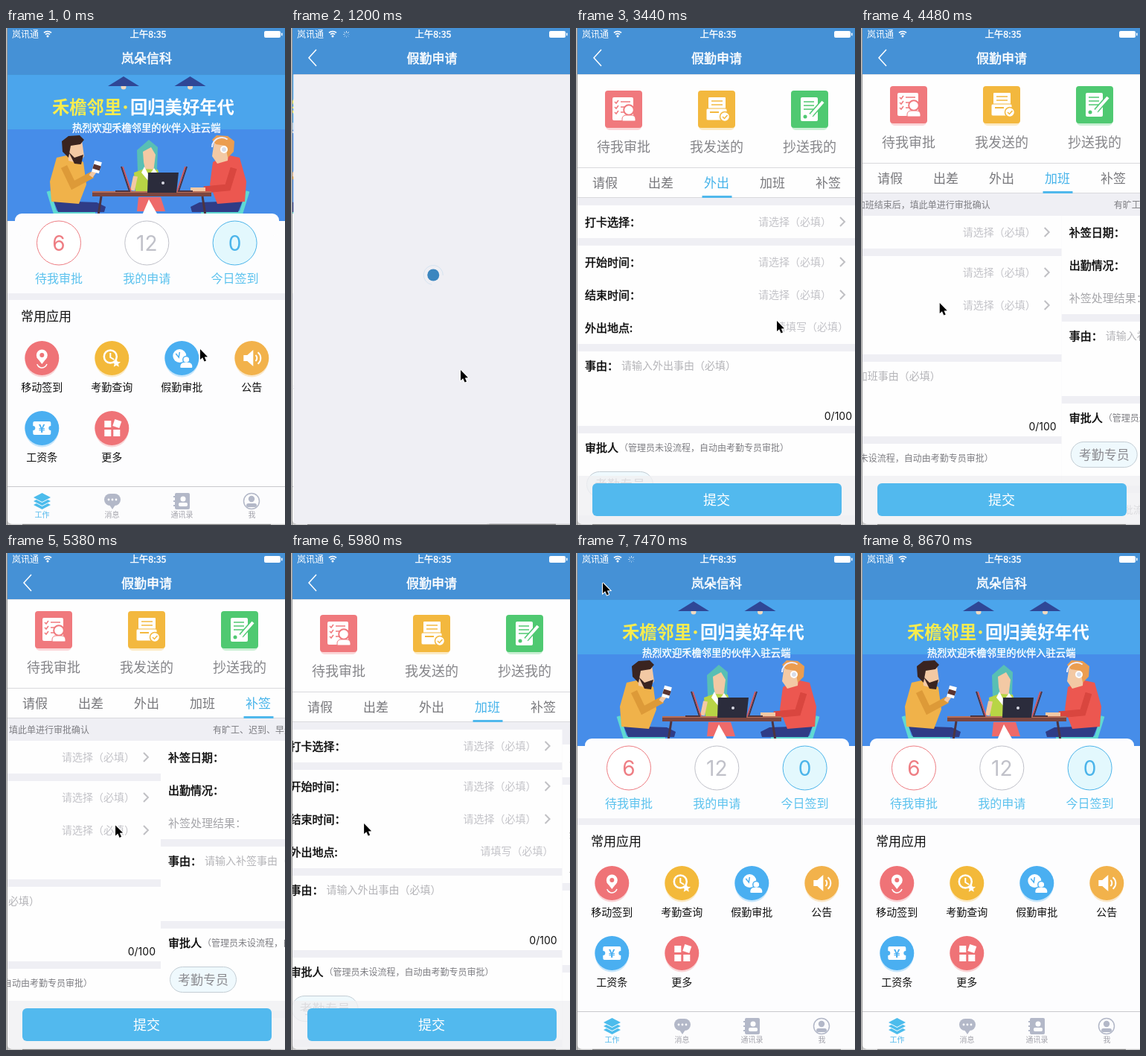
Recreate the animation shown at these times as an HTML page with a canvas. Size 375x667 px, loop 8770 ms.

```html
<!DOCTYPE html>
<html lang="zh">
<head>
<meta charset="utf-8">
<title>假勤申请</title>
<style>
html, body { margin: 0; width: 375px; height: 667px; overflow: hidden; background: #c6c6c6; }
canvas { display: block; width: 375px; height: 667px; }
</style>
</head>
<body>
<canvas id="stage"></canvas>
<script>
const cv = document.getElementById('stage');
const dpr = window.devicePixelRatio || 1;
cv.width = 375 * dpr;
cv.height = 667 * dpr;
const c = cv.getContext('2d');
const LOOP = 8770, STEP = 150, PAGE_W = 376;
const FONT = '"Noto Sans CJK SC", "Noto Sans CJK", "Noto Sans CJK JP", sans-serif';
const DIGITS = 'Inter, "Liberation Sans", sans-serif';
const BLUE = '#50b8ec', GREY = '#efeff4', WHITE = '#fefefe', NAV = '#4591d6', SKIN = '#f3c9a4', DARK = '#4d3440';

// ---- drawing helpers ----
function rect(x, y, w, h, col) { c.fillStyle = col; c.fillRect(x, y, w, h); }
function paint(fill, stroke, w = 1) {
  if (fill) { c.fillStyle = fill; c.fill(); }
  if (stroke) { c.strokeStyle = stroke; c.lineWidth = w; c.stroke(); }
}
function round(x, y, w, h, r, fill, stroke) {
  c.beginPath();
  c.roundRect(x, y, w, h, r);
  paint(fill, stroke);
}
function arc(x, y, r, from, to, col, w) {
  c.beginPath();
  c.arc(x, y, r, from, to);
  paint(null, col, w);
}
function circle(x, y, r, fill, stroke, w) {
  c.beginPath();
  c.arc(x, y, r, 0, 7);
  paint(fill, stroke, w);
}
function trace(p) {
  c.beginPath();
  for (let i = 0; i < p.length; i += 2) c.lineTo(p[i], p[i + 1]);
}
function poly(col, ...p) { trace(p); c.closePath(); paint(col); }
function line(col, w, ...p) { trace(p); paint(null, col, w); }
// Weight 500 is a regular face thickened by a hairline stroke.
function text(s, x, y, size, col, align = 'left', weight = 400, font = FONT) {
  const medium = weight === 500;
  c.font = `${medium ? 400 : weight} ${size}px ${font}`;
  c.textAlign = align;
  c.fillStyle = c.strokeStyle = col;
  c.lineWidth = size * 0.03;
  c.fillText(s, x, y + size * 0.37);
  if (medium) c.strokeText(s, x, y + size * 0.37);
}
function at(x, y, draw) { c.save(); c.translate(x, y); draw(); c.restore(); }
function clip(x, y, w, h) { c.beginPath(); c.rect(x, y, w, h); c.clip(); }
function fade(a, draw) { c.globalAlpha = a; draw(); c.globalAlpha = 1; }

// ---- motion ----
const clamp = v => Math.max(0, Math.min(1, v));
const smooth = v => v * v * (3 - 2 * v);
const easeOut = v => 1 - (1 - v) ** 3;

function tickAt(t) {
  const drift = [2240, 3880, 6120].filter(d => t >= d).length * 10;
  return Math.floor((t + drift) / STEP);
}

// Four swipes forward through the tabs, then four back.
const SWIPES = [13, 19.9, 25, 29, 34.5, 37.5, 40.4, 43.6], SWIPE_LEN = 2.82;
function swipeState(n) {
  let pos = 0, tab = 0, sway = 0;
  SWIPES.forEach((start, k) => {
    const p = clamp((n - start) / SWIPE_LEN), dir = k < 4 ? 1 : -1;
    pos += dir * smooth(p);
    sway -= dir * 90 * Math.sin(2 * Math.PI * p);
    if (p === 1) tab += dir;
  });
  return { pos, tab, sway };
}
function pushAt(n) {
  return n < 30 ? easeOut(clamp((n - 4.6) / 4)) : 1 - easeOut(clamp((n - 48) / 2));
}
const scrollAt = n => n < 29 ? 0 : n < 38 ? -6 : -1;

// Key points of the pointer; each swipe adds its own sway.
const MOUSE = [
  [0, 261, 431], [8, 228, 459], [11, 228, 459], [23, 270, 393], [30, 177, 369],
  [40, 157, 363], [47, 79, 355], [49.5, 36, 40], [52, 36, 40], [54, 261, 407], [58, 261, 407]
];
function drawMouse(n) {
  if (n >= 58) return;
  const i = Math.max(1, MOUSE.findIndex(k => k[0] >= n));
  const [a, x0, y0] = MOUSE[i - 1], [b, x1, y1] = MOUSE[i];
  const p = (n - a) / (b - a);
  at(x0 + (x1 - x0) * p + swipeState(n).sway, y0 + (y1 - y0) * p, () => {
    const arrow = [0, 0, 0, 14, 3.2, 11.2, 5.6, 16.5, 8, 15.4, 5.8, 10.4, 10, 10.2];
    line('#fff', 2, ...arrow, 0, 0);
    poly('#000', ...arrow);
  });
}

// ---- home ----
// One seated figure facing right; the opposite seat mirrors it.
function drawSitter(shirt, hair, bearded) {
  line('#5fd9d2', 5, 57, 219, 66, 248, 120, 248);
  poly('#2f3c86', 64, 232, 122, 234, 134, 240, 132, 247, 70, 247);
  poly(shirt, 68, 174, 86, 170, 104, 180, 108, 210, 98, 236, 61, 233, 59, 206);
  poly(SKIN, 82, 154, 102, 151, 105, 172, 98, 182, 84, 178);
  poly(hair, 75, 152, 84, 145, 99, 144, 105, 150, 100, 156, 87, 158, 84, 174, 76, 166);
  if (bearded) poly(hair, 84, 166, 92, 174, 104, 170, 101, 183, 92, 182);
}

function drawPeople() {
  drawSitter('#f0b24a', '#3a2420', true);
  line('#dd9a38', 9, 78, 186, 90, 211, 116, 197);
  line(SKIN, 6, 114, 199, 122, 188);
  line('#fff', 10, 124, 179, 120, 194);
  line('#5a3430', 10, 123, 184, 121, 190);
  c.save();
  c.translate(382, 0);
  c.scale(-1, 1);
  drawSitter('#ec5750', '#eb9d50', false);
  line('#d9463f', 9, 76, 188, 84, 214, 116, 217);
  line(SKIN, 6, 114, 217, 134, 217);
  arc(92, 160, 13, -2.2, 0, '#eef', 2);
  circle(89, 163, 4, '#d8dce8', '#fff', 2);
  c.restore();

  poly('#58bfb4', 177, 192, 176, 164, 192, 150, 204, 160, 203, 190);
  poly(SKIN, 184, 166, 195, 160, 201, 170, 198, 194, 188, 194, 185, 180);
  poly('#b8d545', 172, 194, 186, 189, 204, 190, 212, 220, 174, 220);
  poly('#fff', 186, 186, 192, 198, 199, 188, 203, 194, 192, 206, 182, 194);
  line(SKIN, 6, 174, 199, 170, 218);
  poly('#ee6a6a', 178, 227, 208, 227, 214, 246, 176, 246);
  poly('#fff', 192, 230, 208, 258, 180, 258);

  rect(116, 220, 160, 6, '#7b4640');
  rect(116, 219, 160, 2, '#b96f58');
  for (const s of [-1, 1]) {
    line(DARK, 3, 196 + 68 * s, 226, 196 + 73 * s, 258);
    line(DARK, 2, 199 + 44 * s, 186, 199 + 33 * s, 219, 199 + 52 * s, 219);
    line('#e4534f', 1.5, 199 + 42 * s, 186, 199 + 31 * s, 219);
  }
  poly('#2b2c3c', 191, 194, 232, 194, 229, 221, 190, 221);
  circle(211, 208, 2, '#d9dae4');
}

function drawBanner() {
  rect(0, 62, 375, 74, '#4ba5ec');
  rect(0, 136, 375, 123, '#468de9');
  for (const x of [158, 247.5]) {
    circle(x, 79, 3.5, '#f0d9bf');
    poly('#2f4796', x - 21, 78, x, 65, x + 21, 78);
  }
  text('禾檐邻里', 62, 106, 23.3, '#f6ec4f', 'left', 700);
  text('·', 160.5, 106, 18, '#f6ec4f', 'center', 700);
  text('回归美好年代', 167, 106, 23.3, '#fff', 'left', 700);
  text('热烈欢迎禾檐邻里的伙伴入驻云端', 89, 134, 13.3, '#fff', 'left', 500);
  drawPeople();
}

function star(x, y, r) {
  const p = [];
  for (let i = 0; i < 10; i++) {
    const a = i * Math.PI / 5 - Math.PI / 2, d = i % 2 ? r * 0.45 : r;
    p.push(x + d * Math.cos(a), y + d * Math.sin(a));
  }
  poly('#fff', ...p);
}
const APPS = [
  ['移动签到', '#ef7377', col => {
    poly('#fff', -7, -1, 7, -1, 0, 8);
    circle(0, -4, 7.5, '#fff');
    circle(0, -4, 3, col);
    arc(0, 6, 7, 0.3, 2.8, '#fff', 1.5);
  }],
  ['考勤查询', '#f3b93a', () => {
    circle(-2, -2, 8.5, null, '#fff', 2.5);
    line('#fff', 2, -2, -7, -2, -1, 3, 2);
    star(6, 7, 6);
  }],
  ['假勤审批', '#4aaff1', col => {
    circle(-3, -3, 9, '#fff');
    line(col, 1.5, -8, -6, -4, -1, -3, -8);
    circle(6, 2, 4.5, '#fff', col, 1.5);
    round(-2, 6, 16, 7, [5, 5, 1, 1], '#fff');
  }],
  ['公告', '#f2b24b', () => {
    poly('#fff', -11, -4, -6, -4, 2, -11, 2, 11, -6, 4, -11, 4);
    for (const r of [5, 10]) arc(2, 0, r, -0.9, 0.9, '#fff', 2);
  }],
  ['工资条', '#4aaff1', col => {
    round(-12, -9, 24, 18, 2, '#fff');
    for (const x of [-12, 12]) circle(x, 0, 3, col);
    text('¥', 0, 0, 15, col, 'center', 700);
  }],
  ['更多', '#ef7377', () => {
    for (const [x, y] of [[-10, -10], [-10, 2], [2, 2]]) rect(x, y, 9, 9, '#fff');
    poly('#fff', 4, -12, 13, -9, 10, 0, 1, -3);
  }]
];

function drawTabBar() {
  const bg = '#fcfcfd', g = '#b3b8c8';
  rect(0, 615, 375, 52, bg);
  rect(0, 615, 375, 1, '#c9c9cd');
  ['工作', '消息', '通讯录', '我'].forEach((s, i) =>
    text(s, 48.5 + i * 94, 653, 10, i ? '#a3a3ab' : BLUE, 'center'));
  for (const y of [640, 635, 630]) {
    poly(bg, 35, y, 48.5, y - 7, 62, y, 48.5, y + 7);
    poly('#4cbcec', 37, y, 48.5, y - 6, 60, y, 48.5, y + 6);
  }
  round(132, 625, 22, 16, 8, g);
  poly(g, 139, 640, 147, 640, 143, 646);
  for (const x of [138, 143, 148]) circle(x, 633, 1.4, '#fff');
  round(227, 624, 20, 22, 2, g);
  for (const y of [628, 634, 640]) rect(225, y, 4, 2, g);
  circle(238, 632, 3.5, '#fff');
  round(232, 637, 12, 5, 2, '#fff');
  circle(330, 635, 10.5, null, g, 1.5);
  circle(330, 632, 4.2, g);
  round(323, 638, 14, 5, 3, g);
}

const STATS = [
  ['6', '待我审批', '#ee7d83', '#fff'],
  ['12', '我的申请', '#c0c1c9', '#fff'],
  ['0', '今日签到', '#4bb4ea', '#e3f8fd']
];
function drawHome() {
  rect(0, 62, 378, 605, '#fdfdfe');
  drawBanner();
  round(12, 249, 355, 30, 9, '#fdfdfe');
  STATS.forEach(([num, name, col, fill], i) => {
    const x = 71 + i * 118.3;
    circle(x, 288.5, 29.5, fill, col);
    text(num, x, 288.5, 28, col, 'center', 400, DIGITS);
    text(name, x, 336, 16, '#5bc2ee', 'center');
  });
  rect(0, 356, 378, 9, GREY);
  text('常用应用', 20, 387, 17, '#111');
  APPS.forEach(([name, col, icon], i) => {
    const x = 48.3 + (i % 4) * 94, y = i < 4 ? 443 : 537;
    fade(0.3, () => circle(x, y + 3, 22.5, col));
    circle(x, y, 23, col);
    at(x, y, () => icon(col));
    text(name, x, y + 38.7, 14, '#111', 'center');
  });
  drawTabBar();
}

// ---- request form ----
const PICK = 'pick', FILL = 'fill', CALC = 'calc', BARE = 'bare', DIM = 'dim';
const TIMES = [['开始时间：', PICK], ['结束时间：', PICK]];
const CLOCK = [['打卡选择：', PICK]];
const PRESET = '（管理员预设流程，但无您适用流程）';
const OPEN = '（管理员未设流程，自动由考勤专员审批）';
const PAGES = [
  { tab: '请假', groups: [[['请假类型：', PICK]], [...TIMES, ['请假时长：', CALC]]], note: PRESET, hintX: 66 },
  { tab: '出差', groups: [CLOCK, [...TIMES, ['出差地点:', FILL]]], note: PRESET },
  { tab: '外出', groups: [CLOCK, [...TIMES, ['外出地点:', FILL]]], note: OPEN, pill: true },
  { tab: '加班', groups: [CLOCK, [...TIMES, ['加班时长：', BARE]]], note: OPEN, pill: true,
    notice: '请加班结束后，填此单进行审批确认' },
  { tab: '补签', groups: [[['补签日期：', BARE], ['出勤情况：', BARE], ['补签处理结果：', DIM]]], note: OPEN, pill: true,
    notice: '有旷工、迟到、早退情况，可提交补签申请' }
];

const label = (s, y) => text(s, 12, y, 15, '#0a0a0a', 'left', 500);

function drawRow([name, kind], y) {
  if (kind === DIM) text(name, 12, y, 15, '#a5a5a9');
  else label(name, y);
  if (kind === PICK) {
    text('请选择（必填）', 245, y, 14, '#c3c3c8');
    line('#c0c0c4', 2, 355, y - 6, 361, y, 355, y + 6);
  } else if (kind === FILL) {
    text('请填写（必填）', 268, y - 1, 14, '#c3c3c8');
  } else if (kind === CALC) {
    round(311, y - 12.5, 46, 24, 12, '#9fe7fe');
    text('计算', 334, y, 15, '#3b8ecb', 'center', 500);
  }
}

function drawPage(pg) {
  let y = 238;
  if (pg.notice) {
    text(pg.notice, 186, 244, 12, '#7d7d82', 'center');
    y = 258;
  }
  for (const rows of pg.groups) {
    rect(2, y, PAGE_W, rows.length * 44, WHITE);
    rows.forEach((r, i) => drawRow(r, y + 22 + i * 44));
    y += rows.length * 44 + 10;
  }
  rect(2, y, PAGE_W, 100, WHITE);
  label('事由：', y + 19);
  text(`请输入${pg.tab}事由（必填）`, pg.hintX || 61, y + 18.5, 14, '#b4b4b8');
  text('0/100', 371, y + 87, 14, '#111', 'right', 400, DIGITS);
  y += 110;
  rect(2, y, PAGE_W, pg.pill ? 110 : 60, WHITE);
  label('审批人', y + 19);
  text(pg.note, 58, y + 20, 12, '#7d7d82');
  if (!pg.pill) return;
  round(14.5, y + 51.5, 89, 34, 17, '#eff9fd', '#c3cdd4');
  text('考勤专员', 59, y + 68.5, 17, '#8b8b90', 'center');
  rect(2, y + 120, PAGE_W, 60, WHITE);
  text('审批流程', 72, y + 142, 13, '#8b8b90');
}

const CARDS = [
  ['待我审批', '#f0797d', col => {
    round(10, 9, 28, 31, 2, '#fff');
    for (const y of [15, 22, 29]) {
      line(col, 1.5, 13, y, 15, y + 2, 18, y - 2);
      line(col, 1.5, 21, y, 34, y);
    }
    circle(32, 26, 6.8, '#fff', col, 2);
    round(23, 33, 18, 8, [5, 5, 1, 1], '#fff', col);
  }],
  ['我发送的', '#f3b83e', col => {
    round(14, 9, 23, 20, 1, '#fff');
    for (const y of [14, 19]) line(col, 1.5, 18, y, 33, y);
    round(11, 24, 28, 16, 2, '#fff', col);
    line(col, 2, 16, 29, 28, 29);
    circle(36, 35, 6.5, '#fff', col, 1.5);
    line(col, 1.5, 33, 35, 35.5, 37.5, 39.5, 33);
  }],
  ['抄送我的', '#4fc971', col => {
    round(13, 9, 23, 32, 2, '#fff');
    for (const y of [15, 20, 25]) line(col, 1.5, 17, y, 31, y);
    circle(19, 35, 2.5, col);
    line(col, 7, 27, 33, 43, 15);
    line('#fff', 4, 28, 32, 43, 15);
    poly('#fff', 25, 36, 26.5, 30.5, 30, 33.5);
  }]
];

function drawForm(n) {
  const { pos, tab } = swipeState(n);
  at(0, scrollAt(n), () => {
    PAGES.forEach((pg, i) => {
      const x = (i - pos) * PAGE_W;
      if (Math.abs(x) < PAGE_W) at(x, 0, () => drawPage(pg));
    });
    rect(0, 55, 378, 172, WHITE);
    CARDS.forEach(([name, col, icon], i) => {
      const x = 39 + i * 125, y = 84;
      fade(0.3, () => round(x + 1, y + 3, 48, 50, 5, col));
      round(x, y, 50, 50, 4, col);
      at(x, y, () => icon(col));
      text(name, x + 25, 159, 18, '#858589', 'center');
    });
    for (const y of [187, 227]) rect(0, y, 378, 1, '#d9d9dd');
    PAGES.forEach((pg, i) =>
      text(pg.tab, 39 + i * 75, 208, 17, i === tab ? '#45b3ea' : '#77777b', 'center'));
    rect(19.5 + tab * 75, 225, 40, 3, BLUE);
  });
  rect(0, 601, 378, 66, 'rgba(241,241,243,0.8)');
  round(22, 611, 335, 44, 6, Math.round(pos) < 2 ? '#a9a9a9' : '#52b9ee');
  text('提交', 189, 633, 18, '#fff', 'center');
}

function drawLoader(n) {
  arc(190, 331.5, 13, n, n + 4.6, '#d5e3f0', 1);
  circle(190, 331.5, 8, '#3b86bf');
}

// ---- bars ----
function drawNav(p) {
  rect(0, 0, 378, 62, NAV);
  rect(0, 62, 378, 0.7, 'rgba(0,0,0,0.14)');
  fade(1 - p, () => text('岚朵信科', 189 - 110 * p, 41, 17, '#fff', 'center', 500));
  fade(p, () => {
    text('假勤申请', 189 + 150 * (1 - p), 41, 17, '#fff', 'center', 500);
    line('#fff', 1.5, 34, 29, 24, 40, 34, 51);
  });
}

function drawStatus(n) {
  const leaving = n > 48;
  text('岚讯通', 8, 8.5, 12, '#fff');
  for (const r of [4.5, 7.5]) arc(56, 12, r, -2.3, -0.84, '#fff', 1.7);
  circle(56, 11, 1.5, '#fff');
  if ((n > 5 && n < 10) || (leaving && n < 54)) {
    for (let i = 0; i < 8; i++) {
      const a = i * Math.PI / 4, s = Math.sin(a), k = Math.cos(a);
      const turn = (i + (leaving ? 0 : n)) % 8;
      fade(0.2 + turn / 10, () =>
        line('#fff', 1, 74.5 + 2 * k, 8.5 + 2 * s, 74.5 + 4.5 * k, 8.5 + 4.5 * s));
    }
  }
  text('上午8:35', 191, 8.5, 12.4, '#fff', 'center', 500);
  round(347, 4, 22, 9, 2, '#fff');
  round(370, 6.5, 1.5, 4, 0.7, '#fff');
}

function draw(t) {
  const n = tickAt(t), p = pushAt(n);
  c.setTransform(dpr, 0, 0, dpr, 0, 0);
  rect(0, 0, 375, 667, '#c6c6c6');
  rect(1, 0, 1, 667, '#959595');
  rect(22, 665, 334, 2, '#7c7c7c');
  c.save();
  c.beginPath();
  c.roundRect(2, -12, 400, 677.5, 6);
  c.clip();
  c.save();
  clip(0, 62, 375, 605);
  if (p < 1) at(-112 * p, 0, drawHome);
  if (p > 0) {
    at(375 * (1 - p), 0, () => {
      clip(2, 62, PAGE_W, 605);
      rect(0, 62, 378, 605, GREY);
      if (n < 10) drawLoader(n);
      else drawForm(n);
    });
  }
  c.restore();
  drawNav(p);
  drawStatus(n);
  c.restore();
  drawMouse(n);
}

const begin = performance.now();
function tick() {
  draw((performance.now() - begin) % LOOP);
  requestAnimationFrame(tick);
}
tick();
</script>
</body>
</html>
```
